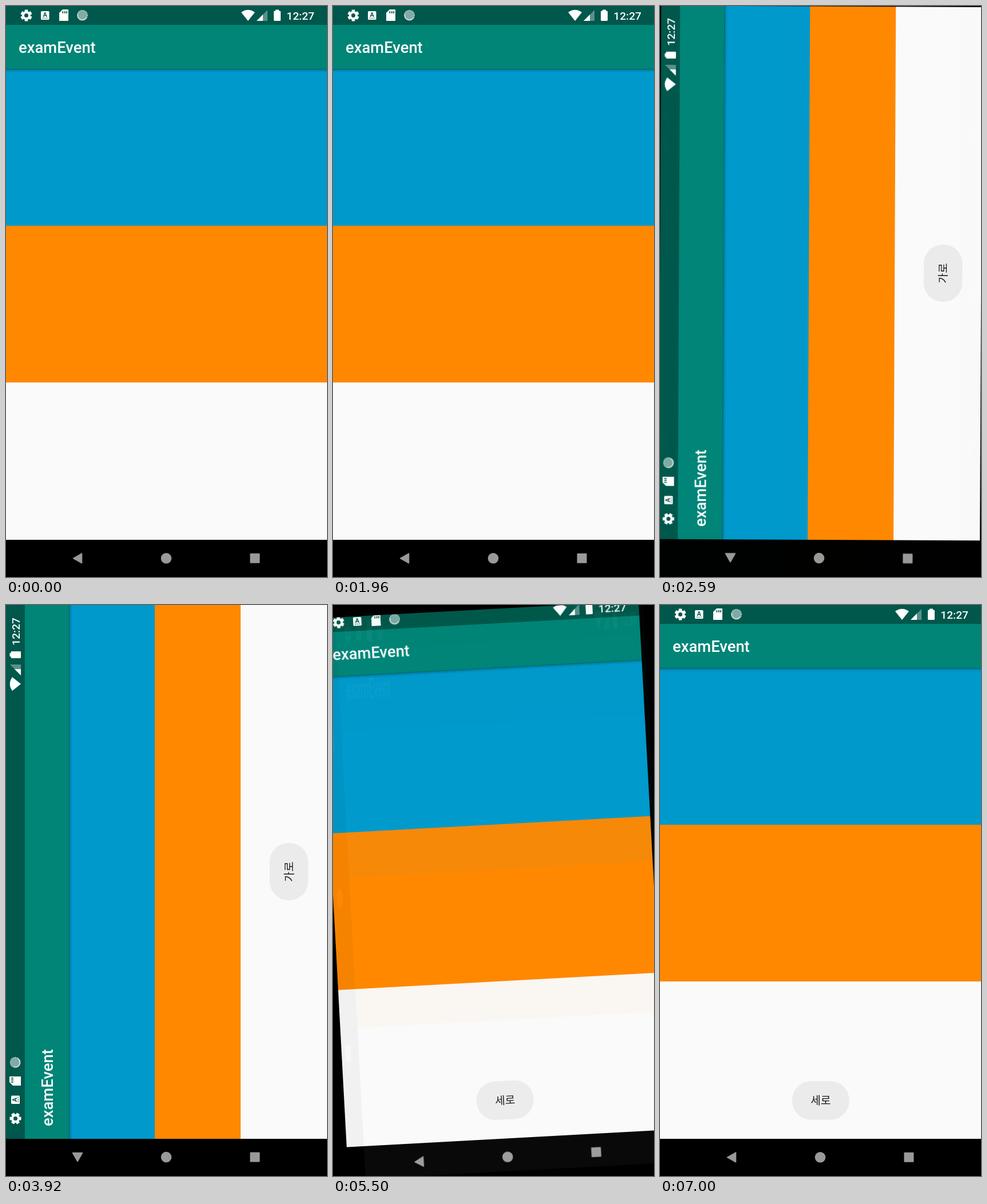
Animation, 561 px wide and 998 px high, one loop 7040 ms. Source, as an HTML page with a canvas:

```html
<!DOCTYPE html>
<html lang="ko">
<head>
<meta charset="utf-8">
<title>examEvent</title>
<style>
  html, body { margin: 0; width: 100%; height: 100%; overflow: hidden; background: #000; }
  canvas { display: block; width: 561px; height: 998px; }
</style>
</head>
<body>
<canvas id="stage" width="561" height="998"></canvas>
<script>
const W = 561, H = 998, LOOP = 7040, STEP = 40, TURN = 400;
const NAV = 65, STATUS = 33, BAR = 111;
const COLORS = { status: '#00574b', bar: '#008577', blue: '#0099cc', orange: '#ff8800', white: '#fafafa', nav: '#999' };
const ctx = document.getElementById('stage').getContext('2d');

function rect(c, color, x, y, w, h) {
  c.fillStyle = color;
  c.fillRect(x, y, w, h);
}

function poly(c, color, ...pts) {
  c.fillStyle = color;
  c.beginPath();
  for (let i = 0; i < pts.length; i += 2) c.lineTo(pts[i], pts[i + 1]);
  c.closePath();
  c.fill();
}

function disc(c, color, x, y, r) {
  c.fillStyle = color;
  c.beginPath();
  c.arc(x, y, r, 0, 2 * Math.PI);
  c.fill();
}

function pill(c, color, x, y, w, h, r) {
  c.fillStyle = color;
  c.beginPath();
  c.roundRect(x, y, w, h, r);
  c.fill();
}

function text(c, str, font, color, x, y, align = 'left') {
  c.font = font;
  c.fillStyle = color;
  c.textAlign = align;
  c.fillText(str, x, y);
}

function gear(c, x, y) {
  c.save();
  c.translate(x, y);
  c.fillStyle = '#fff';
  for (let i = 0; i < 6; i++) {
    c.fillRect(-2.8, -10, 5.6, 6);
    c.rotate(Math.PI / 3);
  }
  disc(c, '#fff', 0, 0, 7.6);
  disc(c, COLORS.status, 0, 0, 3.5);
  c.restore();
}

function spinner(c, x, y) {
  disc(c, 'rgba(255,255,255,.5)', x, y, 9);
  c.lineWidth = 1.6;
  c.strokeStyle = 'rgba(255,255,255,.6)';
  c.setLineDash([1.5, 1.5]);
  c.beginPath();
  c.arc(x, y, 8.8, 0, 2 * Math.PI);
  c.stroke();
  c.setLineDash([]);
  c.beginPath();
  c.arc(x, y, 8, 0.5, 3.4);
  c.stroke();
}

function leftIcons(c) {
  gear(c, 35.5, 16.5);
  pill(c, '#fff', 61, 9, 14.5, 15, 1.5);
  text(c, 'A', 'bold 11px Roboto, sans-serif', COLORS.status, 68.2, 19, 'center');
  for (const x of [64, 67.4, 70.8]) rect(c, COLORS.status, x, 20.5, 1.6, 1.4);
  poly(c, '#fff', 99, 6, 109, 6, 109, 26, 93, 26, 93, 12);
  for (const x of [98.5, 102, 105.3]) rect(c, COLORS.status, x, 9, 1.7, 4);
  spinner(c, 133.5, 16.2);
}

// Coordinates are measured back from the right edge of the screen.
function rightIcons(c) {
  c.fillStyle = '#fff';
  c.beginPath();
  c.moveTo(-138, 26);
  c.lineTo(-150, 11);
  c.quadraticCurveTo(-138, 2.5, -126, 11);
  c.fill();
  poly(c, 'rgba(255,255,255,.35)', -123, 26, -104, 26, -104, 7);
  poly(c, '#fff', -123, 26, -112, 26, -112, 15);
  pill(c, '#fff', -93, 8.5, 12, 17.5, 1.5);
  rect(c, '#fff', -90, 6.5, 6, 3);
  text(c, '12:27', '500 19.2px Roboto, sans-serif', '#fff', -22, 24, 'right');
}

function backIcon(c, x, y) {
  c.lineJoin = 'round';
  c.lineWidth = 1.5;
  c.strokeStyle = COLORS.nav;
  poly(c, COLORS.nav, x - 7.5, y, x + 7.5, y - 8.5, x + 7.5, y + 8.5);
  c.stroke();
}

function navIcons(c, at) {
  backIcon(c, ...at(125));
  disc(c, COLORS.nav, ...at(280), 9.3);
  const [x, y] = at(435);
  pill(c, COLORS.nav, x - 8.5, y - 8.5, 17, 17, 1);
}

// One device screen without its toast.
function makeScreen(wide) {
  const w = wide ? H : W, h = wide ? W : H;
  const left = wide ? NAV : 0;
  const [split1, split2, bottom] = wide ? [260, 410, W] : [384, 658, H - NAV];
  const img = document.createElement('canvas');
  img.width = w;
  img.height = h;
  const c = img.getContext('2d');
  rect(c, '#000', 0, 0, w, h);
  const bands = [[COLORS.status, 0], [COLORS.bar, STATUS], [COLORS.blue, BAR],
    [COLORS.orange, split1], [COLORS.white, split2]];
  bands.forEach(([color, y], i) => {
    const end = i < 4 ? bands[i + 1][1] : bottom;
    rect(c, color, left, y, w - left, end - y);
  });
  const shade = c.createLinearGradient(0, BAR - 1, 0, BAR + 5);
  shade.addColorStop(0, 'rgba(0,0,0,.25)');
  shade.addColorStop(1, 'rgba(0,0,0,0)');
  rect(c, shade, left, BAR - 1, w - left, 6);

  c.save();
  c.translate(left, 0);
  leftIcons(c);
  text(c, 'examEvent', '500 27.4px Roboto, sans-serif', '#fff', 22, 82);
  c.restore();
  c.save();
  c.translate(w, 0);
  rightIcons(c);
  c.restore();
  navIcons(c, wide ? p => [33, p] : p => [p, 965.3]);

  return { img, w, h, label: wide ? '가로' : '세로', toast: wide ? [532, 494.5] : [280.8, 866] };
}

const tall = makeScreen(false), wide = makeScreen(true);

function drawScreen(s) {
  ctx.drawImage(s.img, -s.w / 2, -s.h / 2);
}

function drawToast(s, alpha) {
  const x = s.toast[0] - s.w / 2, y = s.toast[1] - s.h / 2;
  ctx.globalAlpha = alpha;
  pill(ctx, '#ebebeb', x - 50, y - 33.7, 100, 67.4, 33);
  text(ctx, s.label, '19.2px "Noto Sans CJK KR", "Noto Sans CJK", sans-serif', '#1c1c1c', x, y + 7, 'center');
  ctx.globalAlpha = 1;
}

// The screen turns twice; each turn shows a toast that fades out later.
const turns = [
  { start: 2304, from: tall, to: wide, a0: 0, a1: -90 },
  { start: 5304, from: wide, to: tall, a0: -90, a1: 0 }
];
const FADE_DELAY = 1716, FADE = 500;

function draw(time) {
  const t = Math.floor((time - STEP / 2) / STEP) * STEP + STEP / 2;
  const turn = turns.filter(k => t >= k.start).pop();
  ctx.setTransform(1, 0, 0, 1, 0, 0);
  rect(ctx, '#000', 0, 0, W, H);
  ctx.save();
  ctx.translate(W / 2, H / 2);
  if (!turn) {
    drawScreen(tall);
  } else {
    const { from, to, a0, a1 } = turn;
    const age = t - turn.start;
    const rest = Math.max(0, 1 - age / TURN) ** 5;
    const sx = to.w / from.w + (1 - to.w / from.w) * rest;
    const sy = to.h / from.h + (1 - to.h / from.h) * rest;
    ctx.rotate((a1 + (a0 - a1) * rest) * Math.PI / 180);
    if (rest > 0) {
      ctx.beginPath();
      ctx.rect(-from.w * sx / 2, -from.h * sy / 2, from.w * sx, from.h * sy);
      ctx.clip();
    }
    drawScreen(to);
    const fade = Math.min(1, Math.max(0, (age - FADE_DELAY) / FADE));
    if (fade < 1) drawToast(to, 1 - fade * fade);
    if (rest > 0) {
      ctx.globalAlpha = rest;
      ctx.scale(sx, sy);
      drawScreen(from);
      ctx.globalAlpha = 1;
    }
  }
  ctx.restore();
}

const begin = performance.now();
function tick() {
  draw((performance.now() - begin) % LOOP);
  requestAnimationFrame(tick);
}
tick();
</script>
</body>
</html>
```
